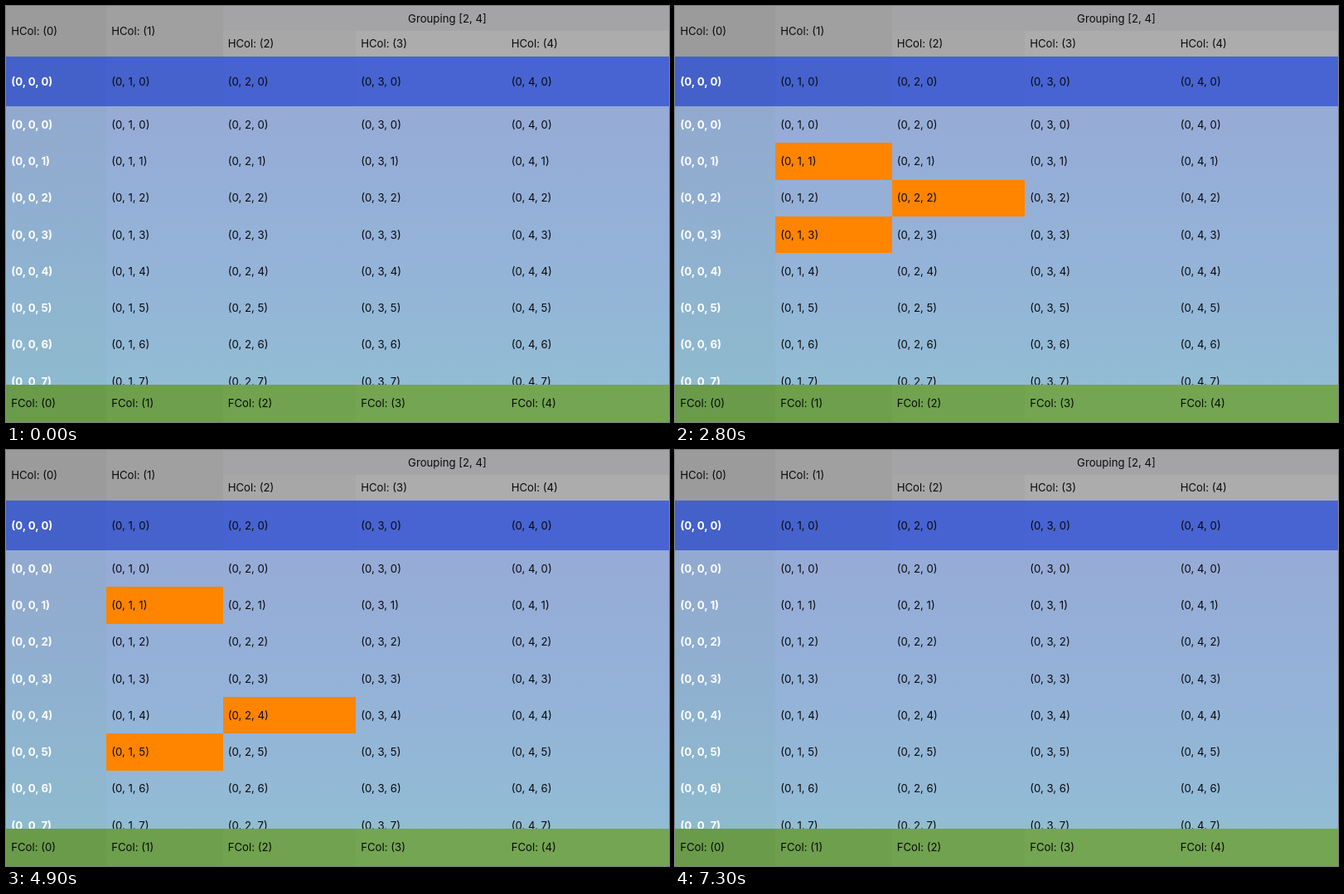
An HTML page that plays this animation: 800 px wide and 502 px high, repeating every 7.4 s.

```html
<!DOCTYPE html>
<html lang="en">
<head>
<meta charset="utf-8">
<title>Table selection</title>
<style>
  html, body { margin: 0; width: 100%; height: 100%; overflow: hidden; }
  svg { display: block; width: 800px; height: 502px; }
  text { font: 13.2px Inter, "Open Sans", sans-serif; fill: #0a0a0a; }
  .lead { font-weight: 700; fill: #fff; }
</style>
</head>
<body>
<svg id="stage" viewBox="0 0 800 502">
  <defs>
    <linearGradient id="sky" x1="0" y1="0" x2="0" y2="1">
      <stop offset="0" stop-color="#96abd6"/>
      <stop offset=".5" stop-color="#94b2d8"/>
      <stop offset="1" stop-color="#92bcd4"/>
    </linearGradient>
    <linearGradient id="side" x1="0" y1="0" x2="0" y2="1">
      <stop offset="0" stop-color="#92a9cf"/>
      <stop offset=".5" stop-color="#8fb1d0"/>
      <stop offset="1" stop-color="#8ebace"/>
    </linearGradient>
    <clipPath id="body"><rect y="121" width="800" height="336.5"/></clipPath>
  </defs>
</svg>
<script>
const LOOP = 7400;
const edges = [0, 121, 261.5, 422, 603.5, 800];
const rowTop = row => 121 + 44.25 * row;
const stage = document.getElementById('stage');

function add(parent, tag, attrs, content = '') {
  const node = document.createElementNS('http://www.w3.org/2000/svg', tag);
  for (const key in attrs) node.setAttribute(key, attrs[key]);
  node.textContent = content;
  return parent.appendChild(node);
}

function box(parent, col, top, bottom, fill, lastCol = col) {
  const x = edges[col];
  return add(parent, 'rect', {
    x, y: top, width: edges[lastCol + 1] - x, height: bottom - top, fill,
    'shape-rendering': 'crispEdges'
  });
}

function label(parent, col, middle, content, className = '') {
  add(parent, 'text', { x: edges[col] + 6.2, y: middle + 4.7, class: className }, content);
}

const headFills = ['#9b9b9c', '#a0a0a1', '#a7a7a8', '#acacac', '#acacad'];
const bandFills = ['#4461c9', '#4562cd', '#4663d1', '#4764d2', '#4764d2'];
const footFills = ['#699b4a', '#6d9f4c', '#70a24f', '#73a552', '#73a552'];

const cells = add(stage, 'g', { 'clip-path': 'url(#body)' });
box(cells, 0, 121, 458, 'url(#side)');
box(cells, 1, 121, 458, 'url(#sky)', 4);

// Column, row, time selected, time cleared
const picks = [
  [1, 1, 1400, 6300],
  [2, 2, 1900, 4200],
  [1, 3, 2400, 4600],
  [2, 4, 2900, 5100],
  [1, 5, 3400, 5500]
];
for (const [col, row, on, off] of picks) {
  const mark = box(cells, col, rowTop(row), rowTop(row + 1), '#ff8400');
  const steps = [[0, 0], [on, 1], [off, 0], [LOOP, 0]];
  mark.animate(
    steps.map(([time, opacity]) => ({ offset: time / LOOP, opacity, easing: 'step-end' })),
    { duration: LOOP, iterations: Infinity }
  );
}

for (let col = 0; col < 5; col++) {
  const style = col ? '' : 'lead';
  box(stage, col, 0, 61, headFills[col]);
  box(stage, col, 61, 121, bandFills[col]);
  box(stage, col, 457, 502, footFills[col]);
  for (let row = 0; row < 8; row++) {
    label(cells, col, rowTop(row) + 22.1, `(0, ${col}, ${row})`, style);
  }
  label(stage, col, 91, `(0, ${col}, 0)`, style);
  label(stage, col, 479.3, `FCol: (${col})`);
}

box(stage, 2, 0, 30, '#a4a4a6', 4);
add(stage, 'text', { x: 532.5, y: 20, 'text-anchor': 'middle' }, 'Grouping [2, 4]');
for (let col = 0; col < 5; col++) {
  label(stage, col, col < 2 ? 30.5 : 45.5, `HCol: (${col})`);
}
</script>
</body>
</html>
```
